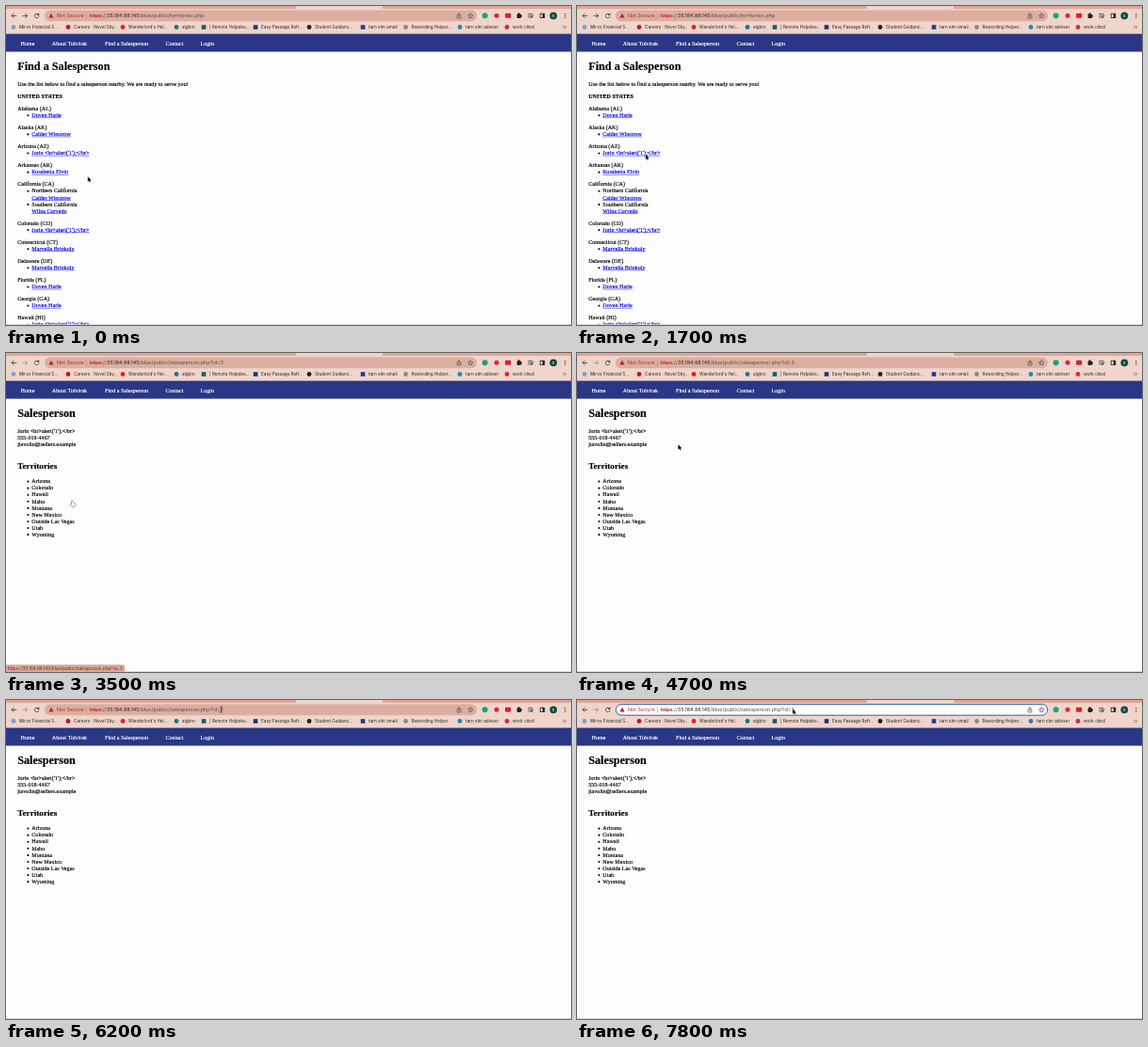
An HTML page with a canvas that plays this animation: 600 px wide and 339 px high, repeating every 8 s.

```html
<!DOCTYPE html>
<html lang="en">
<head>
<meta charset="utf-8">
<title>Find a Salesperson</title>
<style>
  html, body { margin: 0; width: 600px; height: 339px; overflow: hidden; background: #fdfdfd; }
  canvas { display: block; }
</style>
</head>
<body>
<canvas id="stage" width="600" height="339"></canvas>
<script>
const ctx = document.getElementById('stage').getContext('2d');
const LOOP = 8000, NAVIGATE = 3300, HOVER_FIELD = 5950, FOCUS = 6500;
const SERIF = '"Liberation Serif", serif', SANS = 'Inter, sans-serif';
const BODY = 6.1, LINE = 7.07, LINK = '#0000ee', BAR = '#f0d5cb';
const HOST = '35.184.88.145', DIR = '/blue/public/';

const AGENT = "Jorin <br>alert('1');</br>";
const DOVEN = 'Doven Harle', CALDER = 'Calder Winstrow', MARVELLA = 'Marvella Brinkoly';
const STATES = [
  ['Alabama (AL)', DOVEN],
  ['Alaska (AK)', CALDER],
  ['Arizona (AZ)', AGENT],
  ['Arkansas (AR)', 'Rosabetta Elvin'],
  ['California (CA)', ['Northern California', CALDER], ['Southern California', 'Wilna Corvedo']],
  ['Colorado (CO)', AGENT],
  ['Connecticut (CT)', MARVELLA],
  ['Delaware (DE)', MARVELLA],
  ['Florida (FL)', DOVEN],
  ['Georgia (GA)', DOVEN],
  ['Hawaii (HI)', AGENT]
];
const TERRITORIES = ['Arizona', 'Colorado', 'Hawaii', 'Idaho', 'Montana',
  'New Mexico', 'Outside Las Vegas', 'Utah', 'Wyoming'];
const MENU = [[15.5, 'Home'], [48.8, 'About Tolvirak'], [105, 'Find a Salesperson'],
  [169.5, 'Contact'], [206.5, 'Login']];
const BOOKMARKS = [
  [8, 'Mirvo Financial S...', '#7d9fd0'],
  [66, 'Careers : Novel Sky...', '#b5182f'],
  [124, "Wanderlord's Hel...", '#d8232a'],
  [181, 'algbro', '#17758c'],
  [210, '| Remote Helpdes...', '#12606b', 'square'],
  [265, 'Easy Passage Refr...', '#123a70', 'square'],
  [322, 'Student Guidanc...', '#222222'],
  [379, 'tarn elm email', '#173f91', 'square'],
  [424.5, 'Rewording Helper...', '#8d8580'],
  [482, 'tarn elm adviser', '#2386b5'],
  [532, 'work cited', '#d52b35']
];
// time, x, y of the pointer tip
const PATH = [[0, 86.8, 181.2], [500, 86.8, 181.2], [1300, 72.8, 157.6], [2300, 72.8, 157.6],
  [2800, 70, 157.2], [3550, 70, 157.2], [3950, 94, 122], [4400, 107.4, 97.2],
  [5000, 107.4, 97.2], [5800, 212, 30], [6150, 228.4, 10.3], [6700, 228.4, 10.3], [7200, 229, 9.4]];

// Laid out at ten times the size so that small glyph advances stay exact;
// the thin outline gives the slightly heavy look of smoothed screen text.
function text(str, x, y, size = BODY, color = '#000', family = SERIF, weight = 400) {
  ctx.save();
  ctx.translate(x, y);
  ctx.scale(0.1, 0.1);
  ctx.font = `${weight} ${size * 10}px ${family}`;
  ctx.fillStyle = ctx.strokeStyle = color;
  ctx.fillText(str, 0, 0);
  if (family === SERIF) {
    ctx.lineWidth = 1.6;
    ctx.lineJoin = 'round';
    ctx.strokeText(str, 0, 0);
  }
  const width = ctx.measureText(str).width / 10;
  ctx.restore();
  return width;
}

function rect(x, y, w, h, color) {
  ctx.fillStyle = color;
  ctx.fillRect(x, y, w, h);
}

function rounded(x, y, w, h, r, color) {
  ctx.beginPath();
  ctx.roundRect(x, y, w, h, r);
  ctx.fillStyle = color;
  ctx.fill();
}

function dot(x, y, r, color = '#000') {
  ctx.beginPath();
  ctx.arc(x, y, r, 0, Math.PI * 2);
  ctx.fillStyle = color;
  ctx.fill();
}

function stroke(d, x, y, color = '#333', width = 0.8) {
  ctx.save();
  ctx.translate(x, y);
  ctx.strokeStyle = color;
  ctx.lineWidth = width;
  ctx.lineJoin = ctx.lineCap = 'round';
  ctx.stroke(new Path2D(d));
  ctx.restore();
}

function link(str, x, y) {
  const width = text(str, x, y, BODY, LINK);
  rect(x, y + 0.6, width, 0.5, LINK);
}

function bullet(y) {
  dot(23.4, y - 1.7, 1.05);
}

function url(x, y, size, page) {
  const scheme = text('https', x, y, size, '#c5221f', SANS);
  rect(x, y - size * 0.31, scheme, 0.6, '#c5221f');
  x += scheme;
  x += text('://', x, y, size, '#6b4a45', SANS);
  x += text(HOST, x, y, size, '#2b2020', SANS);
  text(DIR + page, x, y, size, '#5d4a46', SANS);
}

function toolbar(time, page) {
  rect(0, 0, 600, 30, BAR);
  rect(0, 0, 308, 3, '#e2a596');
  rect(400, 0, 200, 3, '#e2a596');

  stroke('M2.3 0H-2.3M-.2 -2.2L-2.4 0L-.2 2.2', 8.4, 10.4);
  stroke('M-2.3 0H2.3M.2 -2.2L2.4 0L.2 2.2', 20.3, 10.4, time < NAVIGATE ? '#333' : '#a58f88');
  stroke('M1.9 -1.2A2.3 2.3 0 1 0 2.2 .7M2.2 -2.5V-.9H.6', 32.7, 10.4);

  const focused = time >= FOCUS;
  rounded(41, 4.6, 459, 11.6, 5.8, focused ? '#fffdfc' : '#dcaea2');
  if (focused) {
    ctx.beginPath();
    ctx.roundRect(41.3, 4.6, 458.4, 11.6, 5.8);
    ctx.strokeStyle = '#2863b4';
    ctx.lineWidth = 1;
    ctx.stroke();
  }
  ctx.fillStyle = '#b3261e';
  ctx.fill(new Path2D('M48 7.8L50.6 12.5H45.4Z'));
  text('Not Secure', 54, 12.3, 5.4, '#b3261e', SANS);
  rect(85.2, 7.4, 0.6, 6.2, '#b98c80');
  url(88.6, 12.3, 5.43, page);

  stroke('M-1 -.8H-1.9V2.4H1.9V-.8H1M0 1V-2.7M-1.2 -1.6L0 -2.8L1.2 -1.6', 481, 10.6, '#444', 0.6);
  stroke('M0 -2.7L.8 -.8L2.7 -.7L1.2 .5L1.7 2.4L0 1.3L-1.7 2.4L-1.2 .5L-2.7 -.7L-.8 -.8Z', 493.3, 10.5, '#444', 0.6);

  dot(508.6, 10.3, 3, '#12a57d');
  dot(521, 10.3, 2.5, '#dc2340');
  rounded(530, 7.8, 6.2, 5, 1, '#d4232f');
  rounded(542.6, 8.6, 4.3, 4.3, 0.6, '#222');
  dot(544.6, 8.4, 1.1, '#222');
  dot(547, 10.7, 1.1, '#222');
  stroke('M-2.5 -2H1.8M-2.5 -.2H1.8M-2.5 1.6H-.3M1.6 1.7V-.2H2.8', 557.2, 10.4, '#333', 0.7);
  dot(558, 12.1, 0.9, '#333');
  rounded(566.8, 7.7, 5.4, 5.4, 0.7, '#222');
  rect(567.6, 8.6, 2.1, 3.6, BAR);
  dot(581.3, 10.3, 3.9, '#174b43');
  text('s', 580, 11.7, 4.4, '#fff', SANS);
  for (const dy of [-2, 0, 2]) dot(593.8, 10.4 + dy, 0.6, '#333');

  for (const [x, label, color, shape] of BOOKMARKS) {
    if (shape) rect(x - 2.3, 20.2, 4.6, 4.6, color);
    else dot(x, 22.5, 2.4, color);
    text(label, x + 6.1, 24.2, 4.6, '#2b2322', SANS);
  }
  stroke('M-1.6 -1.3L-.3 0L-1.6 1.3M.4 -1.3L1.7 0L.4 1.3', 593.2, 22.5, '#444', 0.6);
}

function menu() {
  rect(0, 29.6, 600, 19, '#293786');
  for (const [x, label] of MENU) text(label, x, 41.8, BODY, '#fff');
}

function territoriesPage() {
  text('Find a Salesperson', 12.2, 67.9, 12.2, '#000', SERIF, 700);
  text('Use the list below to find a salesperson nearby. We are ready to serve you!', 12.2, 84.8);
  text('UNITED STATES', 12.2, 98, BODY, '#000', SERIF, 700);
  let y = 110.9;
  for (const [state, ...people] of STATES) {
    text(state, 12.2, y);
    for (const person of people) {
      y += LINE;
      bullet(y);
      if (Array.isArray(person)) {
        text(person[0], 27.3, y);
        y += LINE;
        link(person[1], 27.3, y);
      } else {
        link(person, 27.3, y);
      }
    }
    y += 13.05;
  }
}

function salespersonPage() {
  text('Salesperson', 12.2, 67.9, 12.2, '#000', SERIF, 700);
  [AGENT, '555-018-4467', 'jtavolin@sellers.example']
    .forEach((row, i) => text(row, 12.2, 84.8 + i * LINE));
  text('Territories', 12.2, 123, 9.2, '#000', SERIF, 700);
  TERRITORIES.forEach((name, i) => {
    const y = 138.3 + i * LINE;
    bullet(y);
    text(name, 27.3, y);
  });
}

function statusBar() {
  rounded(-2, 331.3, 128, 10, 1.5, '#dca797');
  text('https://' + HOST + DIR + 'salesperson.php?id=3', 1.8, 337, 4.65, '#4f3a35', SANS);
}

function position(time) {
  const next = PATH.findIndex(p => p[0] > time);
  if (next < 0) return PATH[PATH.length - 1].slice(1);
  const [t0, x0, y0] = PATH[next - 1], [t1, x1, y1] = PATH[next];
  const u = (time - t0) / (t1 - t0), e = u * u * (3 - 2 * u);
  return [x0 + (x1 - x0) * e, y0 + (y1 - y0) * e];
}

function pointer(time) {
  const [x, y] = position(time);
  if (time >= HOVER_FIELD && time < 6800) {
    stroke('M-1 -3Q0 -3 0 -2.3V2.3Q0 3 -1 3M1 -3Q0 -3 0 -2.3M0 2.3Q0 3 1 3', x, y, '#222', 0.6);
    return;
  }
  const hand = time >= 2600 && time < 3600;
  const shape = new Path2D(hand
    ? 'M-.3 0Q.5 -.6 .9 .2L1.2 2L3 2.4Q3.8 2.6 3.6 3.6L3 6H.2L-1.7 3.7Q-1.4 2.8 -.3 3.5Z'
    : 'M0 0V5.5L1.25 4.4L2.1 6.3L3 5.9L2.2 4.1H3.9Z');
  ctx.save();
  ctx.translate(x, y);
  ctx.lineJoin = 'round';
  ctx.lineWidth = hand ? 0.7 : 0.9;
  ctx.strokeStyle = hand ? '#111' : '#fff';
  ctx.fillStyle = hand ? '#fff' : '#000';
  ctx.stroke(shape);
  ctx.fill(shape);
  ctx.restore();
}

function draw(now) {
  const time = now % LOOP;
  const listing = time < NAVIGATE;
  rect(0, 0, 600, 339, '#fdfdfd');
  if (listing) territoriesPage();
  else salespersonPage();
  toolbar(time, listing ? 'territories.php' : 'salesperson.php?id=3');
  menu();
  rect(0, 338.2, 600, 0.8, '#d0d0d0');
  if (time >= 2700 && time < 3800) statusBar();
  pointer(time);
}

const start = performance.now();
function tick() {
  draw(performance.now() - start);
  requestAnimationFrame(tick);
}
tick();
</script>
</body>
</html>
```
